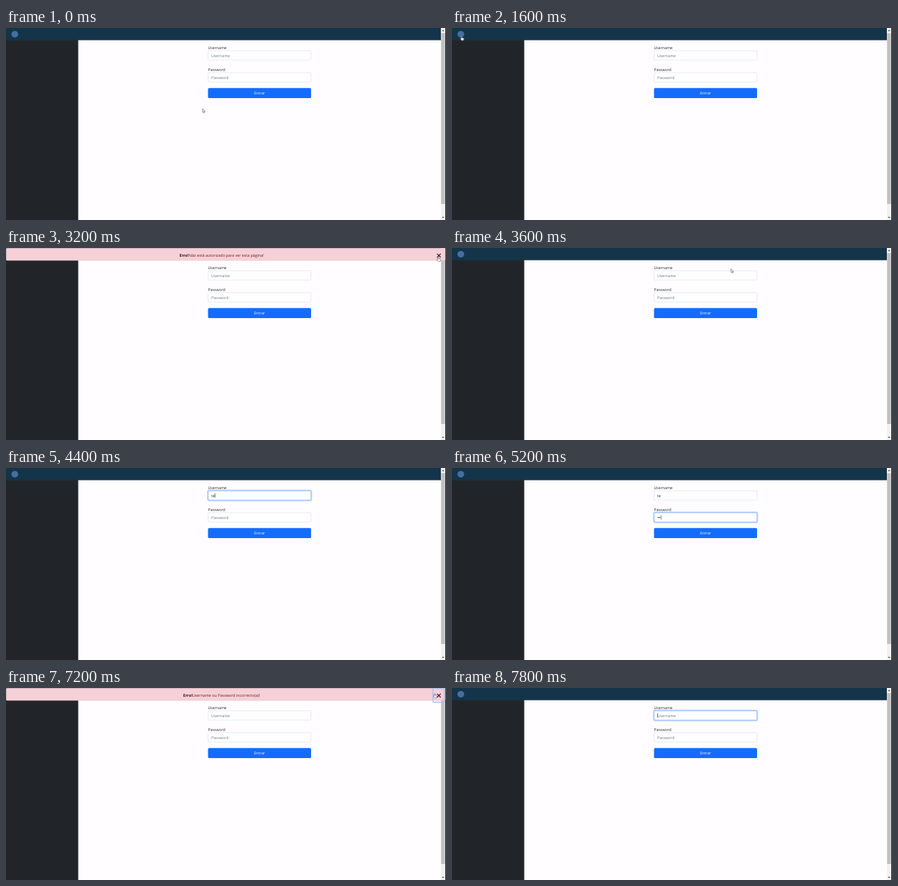
An HTML page for the animation above (8 s loop, 600 px wide and 263 px high).

```html
<!DOCTYPE html>
<html lang="pt">
<head>
<meta charset="utf-8">
<title>Login</title>
<style>
  html, body { margin: 0; width: 100%; height: 100%; overflow: hidden; background: #fffdff; }
  svg { display: block; width: 100vw; height: 100vh; }
  text { font: 5.22px "Open Sans", "Noto Sans", sans-serif; fill: #212529; text-rendering: geometricPrecision; }
  .hint { fill: #6c757d; }
  .field { fill: #fff; stroke: #ced4da; stroke-width: .5; }
  .ring { fill: none; stroke: #0d6efd; stroke-opacity: .27; stroke-width: 1.5; }
  .edge { fill: none; stroke: #86b7fe; stroke-width: .6; }
  .caret { stroke: #111; stroke-width: .6; }
  .alert text { font-size: 5.3px; fill: #6a1a26; text-anchor: middle; }
  .alert tspan { font-weight: 700; fill: #3c0d14; }

  .anim { visibility: hidden; animation: 8s step-end infinite; }
  .denied { animation-name: denied; }
  .wrong { animation-name: wrong; }
  .close-ring { animation-name: close-ring; }
  .user-focus { animation-name: user-focus; }
  .user-hint { animation-name: user-hint; }
  .user-t { animation-name: user-t; }
  .user-e { animation-name: user-e; }
  .caret0 { animation-name: caret0; }
  .caret1 { animation-name: caret1; }
  .caret2 { animation-name: caret2; }
  .pass-focus { animation-name: pass-focus; }
  .pass-hint { animation-name: pass-hint; }
  .pass-caret { animation-name: pass-caret; }
  .dot1 { animation-name: dot1; }
  .dot2 { animation-name: dot2; }
  .arrow { animation-name: arrow; }
  .hand { animation-name: hand; }
  .beam { animation-name: beam; }
  .pointer { animation: move 8s step-end infinite; }

  /* 2.5% = 200 ms */
  @keyframes denied { 27.5% { visibility: visible } 42.5% { visibility: hidden } }
  @keyframes wrong { 72.5% { visibility: visible } 92.5% { visibility: hidden } }
  @keyframes close-ring { 90% { visibility: visible } 92.5% { visibility: hidden } }
  @keyframes user-focus { 47.5% { visibility: visible } 60% { visibility: hidden } 97.5%, 100% { visibility: visible } }
  @keyframes user-hint { 0% { visibility: visible } 52.5% { visibility: hidden } 72.5%, 100% { visibility: visible } }
  @keyframes user-t { 52.5% { visibility: visible } 72.5% { visibility: hidden } }
  @keyframes user-e { 55% { visibility: visible } 72.5% { visibility: hidden } }
  @keyframes caret0 { 50% { visibility: visible } 52.5% { visibility: hidden } 97.5%, 100% { visibility: visible } }
  @keyframes caret1 { 52.5% { visibility: visible } 55% { visibility: hidden } }
  @keyframes caret2 { 55% { visibility: visible } 57.5% { visibility: hidden } }
  @keyframes pass-focus { 60% { visibility: visible } 72.5% { visibility: hidden } }
  @keyframes pass-hint { 0% { visibility: visible } 62.5% { visibility: hidden } 72.5%, 100% { visibility: visible } }
  @keyframes pass-caret {
    60% { visibility: visible; transform: none }
    62.5% { visibility: visible; transform: translateX(2.3px) }
    65% { visibility: visible; transform: translateX(4.6px) }
    72.5% { visibility: hidden }
  }
  @keyframes dot1 { 62.5% { visibility: visible } 72.5% { visibility: hidden } }
  @keyframes dot2 { 65% { visibility: visible } 72.5% { visibility: hidden } }

  @keyframes arrow {
    0% { visibility: visible } 20% { visibility: hidden }
    32.5% { visibility: visible } 40% { visibility: hidden }
    42.5% { visibility: visible } 47.5% { visibility: hidden }
    77.5% { visibility: visible } 87.5% { visibility: hidden }
    92.5% { visibility: visible } 97.5% { visibility: hidden }
  }
  @keyframes hand {
    20% { visibility: visible } 32.5% { visibility: hidden }
    40% { visibility: visible } 42.5% { visibility: hidden }
    87.5% { visibility: visible } 92.5% { visibility: hidden }
  }
  @keyframes beam { 47.5% { visibility: visible } 52.5% { visibility: hidden } }
  @keyframes move {
    0% { transform: translate(268px, 110.5px) }
    12.5% { transform: translate(236px, 95px) }
    15% { transform: translate(124px, 47px) }
    17.5% { transform: translate(28px, 16px) }
    20% { transform: translate(12.5px, 11px) }
    32.5% { transform: translate(70px, 14px) }
    35% { transform: translate(280px, 22px) }
    37.5% { transform: translate(530px, 17px) }
    40% { transform: translate(588.8px, 12.3px) }
    42.5% { transform: translate(560px, 15px) }
    45% { transform: translate(380.5px, 28.5px) }
    47.5% { transform: translate(366px, 37.5px) }
    77.5% { transform: translate(297px, 21px) }
    80% { transform: translate(385px, 18px) }
    82.5% { transform: translate(480px, 14px) }
    85% { transform: translate(553px, 10px) }
    87.5%, 90% { transform: translate(584px, 7.5px) }
    92.5% { transform: translate(570px, 11px) }
    95%, 100% { transform: translate(420px, 30px) }
  }
</style>
</head>
<body>
<svg viewBox="0 0 600 263" preserveAspectRatio="none">
  <defs>
    <path id="cross" d="M587.8 7.8l5 5m0-5l-5 5" stroke="#1a1416" stroke-width="1.1" fill="none"/>
    <g id="glow">
      <rect class="ring" x="274.9" y="30.4" width="141.7" height="14.4" rx="2"/>
      <rect class="edge" x="275.7" y="31.2" width="140.1" height="12.8" rx="1.3"/>
    </g>
  </defs>

  <rect width="600" height="263" fill="#fffdff"/>
  <rect y="16" width="98.5" height="247" fill="#212529"/>
  <rect width="593" height="16.7" fill="#14344a"/>
  <circle cx="12" cy="8.5" r="4.6" fill="#456f9f"/>

  <rect x="593" width="6" height="263" fill="#f1f1f1"/>
  <rect x="593.3" y="7" width="5.4" height="234" fill="#c1c1c1"/>
  <path d="M594.6 4.2h2.8l-1.4-1.8zM594.6 258.8h2.8l-1.4 1.8z" fill="#333"/>
  <rect x="599" width="1" height="263" fill="#222"/>

  <text x="275.5" y="28.7">Username</text>
  <rect class="field" x="275.7" y="31.2" width="140.1" height="12.8" rx="1.3"/>
  <g class="anim user-focus"><use href="#glow"/></g>
  <text class="anim user-hint hint" x="280" y="39.5">Username</text>
  <text x="280" y="39.5"><tspan class="anim user-t">t</tspan><tspan class="anim user-e">e</tspan></text>
  <path class="anim caret caret0" d="M280.3 34.6v6"/>
  <path class="anim caret caret1" d="M282.1 34.6v6"/>
  <path class="anim caret caret2" d="M285 34.6v6"/>

  <text x="275.5" y="58.9">Password</text>
  <rect class="field" x="275.7" y="61.2" width="140.1" height="12.8" rx="1.3"/>
  <g class="anim pass-focus"><use href="#glow" y="30"/></g>
  <text class="anim pass-hint hint" x="280" y="69.5">Password</text>
  <circle class="anim dot1" cx="281.2" cy="67.7" r=".8" fill="#212529"/>
  <circle class="anim dot2" cx="283.4" cy="67.7" r=".8" fill="#212529"/>
  <path class="anim caret pass-caret" d="M280.3 64.6v6"/>

  <rect x="275.5" y="82.3" width="140.5" height="13.7" rx="1.5" fill="#146cfb"/>
  <text x="345.7" y="91.1" text-anchor="middle" style="fill:#fff">Entrar</text>

  <g class="anim alert denied">
    <rect x=".2" y=".2" width="598.8" height="16.9" rx="1.5" fill="#f5d0d7" stroke="#edb9c2" stroke-width=".5"/>
    <text x="294" y="12.2"><tspan>Erro!</tspan>Não está autorizado para ver esta página!</text>
    <use href="#cross"/>
  </g>
  <g class="anim alert wrong">
    <rect x=".2" y=".2" width="598.8" height="16.9" rx="1.5" fill="#f5d0d7" stroke="#edb9c2" stroke-width=".5"/>
    <text x="294" y="12.2"><tspan>Erro!</tspan>Username ou Password incorrecto(a)!</text>
    <use href="#cross"/>
  </g>
  <rect class="anim close-ring" x="582.2" y=".7" width="15.6" height="18.8" rx="1.5" fill="none" stroke="#a9bfec" stroke-width="1.3"/>

  <g class="pointer">
    <path class="anim arrow" d="M0 0V5L1.2 4L2 5.8L2.8 5.4L2 3.7H3.6Z" fill="#fff" stroke="#333" stroke-width=".5"/>
    <path class="anim hand" d="M0 .4Q.6-.3 1.1.4V2.3L3.3 2.8Q3.9 3 3.8 3.8L3.2 6.2H.6L-1.3 3.7Q-1.2 2.9-.4 3.3L0 3.6Z" fill="#fff" stroke="#333" stroke-width=".5"/>
    <path class="anim beam" d="M-1-2.8h2M-1 2.8h2M0-2.8v5.6" fill="none" stroke="#333" stroke-width=".5"/>
  </g>
</svg>
</body>
</html>
```
